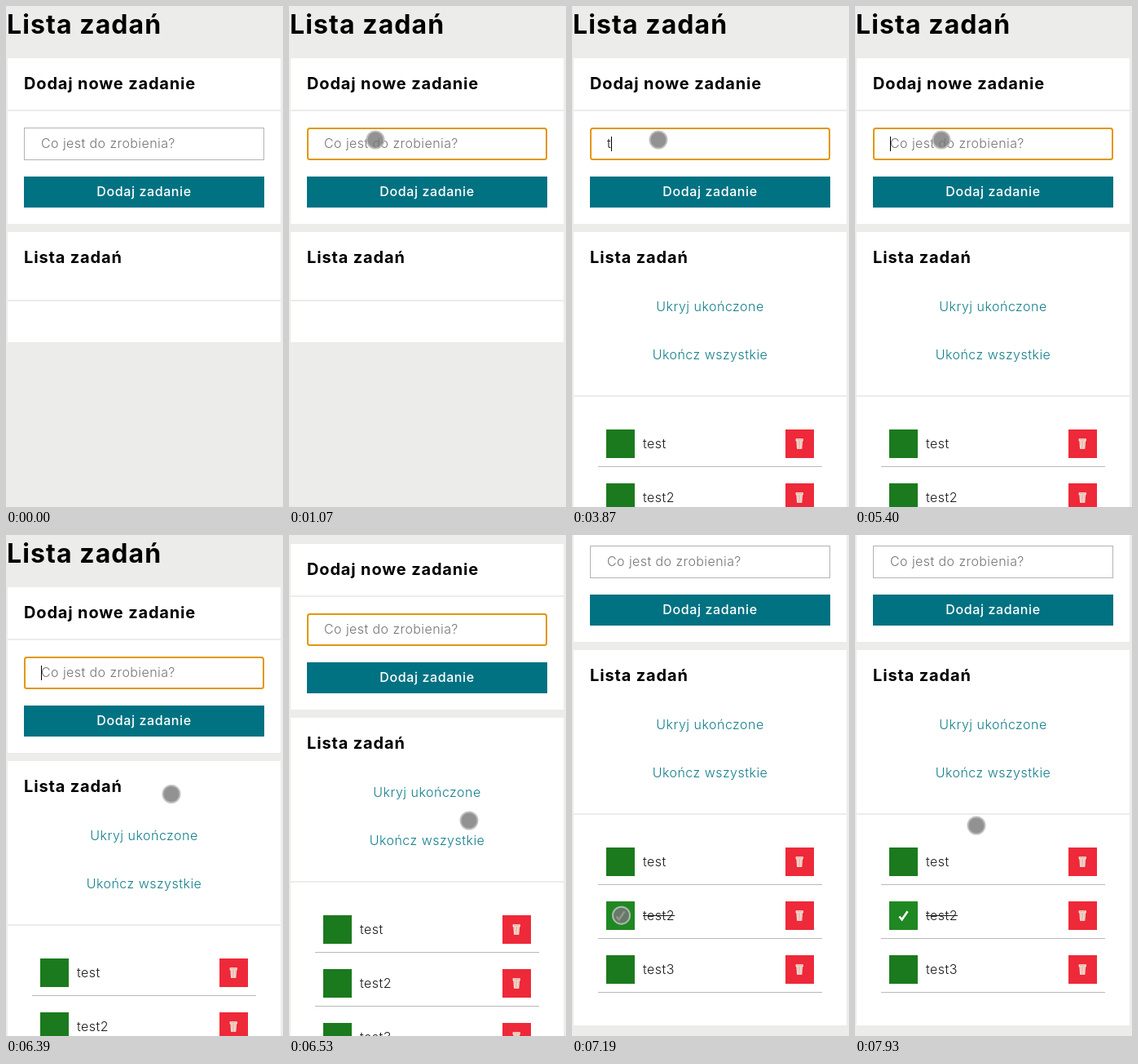
An HTML page for the animation above (8000 ms loop, 340x614 px).

```html
<!DOCTYPE html>
<html lang="pl">
<head>
<meta charset="utf-8">
<title>Lista zadań</title>
<style>
  html, body { margin: 0; width: 100%; height: 100%; overflow: hidden; background: #ececeb; }
  svg { display: block; width: 340px; height: 614px; }
  text { font: 360 16px Inter, "Open Sans", sans-serif; letter-spacing: .03em; fill: #1c1c1c; white-space: pre; }
  .h1 { font-size: 32px; font-weight: 700; fill: #000; letter-spacing: .034em; }
  .h2 { font-size: 20px; font-weight: 650; fill: #000; letter-spacing: .042em; }
  .mid { text-anchor: middle; }
  .link { fill: #127e8c; }
  .button { fill: #fff; font-weight: 460; letter-spacing: .038em; }
  .hint { fill: #757575; letter-spacing: .026em; }
</style>
</head>
<body>
<svg viewBox="0 0 340 614"></svg>
<script>
const LOOP = 8000, STEP = 200 / 3;
const svg = document.querySelector('svg');

function add(parent, tag, attrs, content = '') {
  const node = document.createElementNS('http://www.w3.org/2000/svg', tag);
  for (const key in attrs) node.setAttribute(key, attrs[key]);
  node.textContent = content;
  parent.append(node);
  return node;
}
const rect = (parent, x, y, width, height, fill) => add(parent, 'rect', { x, y, width, height, fill });
const label = (parent, x, y, cls, content) => add(parent, 'text', { x, y, class: cls }, content);
const show = (node, on) => node.setAttribute('visibility', on ? 'visible' : 'hidden');
const move = (node, x, y) => node.setAttribute('transform', `translate(${x} ${y})`);

const page = add(svg, 'g', {});
label(page, 1, 34, 'h1', 'Lista zadań');

// Form card
rect(page, 2, 64, 335, 203, '#fff');
rect(page, 2, 127, 335, 2, '#ececeb');
label(page, 22, 102, 'h2', 'Dodaj nowe zadanie');
const field = add(page, 'rect', { fill: '#fff' });
const hint = label(page, 43, 174, 'hint', 'Co jest do zrobienia?');
const typed = label(page, 43, 174, '', '');
const caret = rect(page, 43, 160, 1, 18, '#000');
rect(page, 22, 209, 295, 38, '#007282');
label(page, 169.5, 233, 'mid button', 'Dodaj zadanie');

// List card
const card = rect(page, 2, 277, 335, 135, '#fff');
const divider = rect(page, 2, 360, 335, 2, '#ececeb');
label(page, 22, 315, 'h2', 'Lista zadań');
const links = add(page, 'g', {});
label(links, 169.5, 374, 'mid link', 'Ukryj ukończone');
label(links, 169.5, 433, 'mid link', 'Ukończ wszystkie');

const tasks = [['test', 1930], ['test2', 3390], ['test3', 5400]].map(([name, at], i) => {
  const group = add(page, 'g', {});
  move(group, 0, 519 + 66 * i);
  const box = rect(group, 42, 0, 35, 35, '#1b7a1d');
  const check = add(group, 'path', { d: 'M54.5 18.5 57.6 22.3 64.6 12.2', fill: 'none', stroke: '#fff', 'stroke-width': 2.6 });
  const text = label(group, 87, 23, '', name);
  const strike = rect(group, 87, 17, 39, 1, '#1c1c1c');
  rect(group, 262, 0, 35, 35, '#ee2939');
  add(group, 'path', { d: 'M275.2 11.8h8v2h-8zM276 14l.6 9.3h5.2l.6-9.3M278 14.5l.2 8M280.4 14.5l-.2 8', fill: '#d9a092', stroke: '#f8efe4', 'stroke-width': 1.1 });
  rect(group, 32, 45, 275, 1, '#b9b9b9');
  return { group, box, check, text, strike, at };
});

const pointer = add(svg, 'circle', { r: 10.5, fill: '#777', 'fill-opacity': .8, stroke: '#bcbcbc', 'stroke-width': 2, 'stroke-opacity': .9 });

const FOCUS = 600, BLUR = 6930, CHECKED = 7000;
const typing = [
  [0, ''], [1270, 't'], [1330, 'te'], [1530, 'tes'], [1590, 'test'], [1930, ''],
  [2400, 't'], [2530, 'te'], [2730, 'tes'], [2800, 'test'], [3060, 'test2'], [3390, ''],
  [3870, 't'], [4130, 'te'], [4270, 'tes'], [4390, 'test'], [4600, 'test4'],
  [4930, 'test'], [5000, 'test3'], [5400, '']
];
const caretOn = [[600, 1070], [1270, 2130], [2400, 3530], [3870, 5530], [6060, 6530]];
const scrollPath = [[6400, 0], [6460, 14], [6530, 53], [6600, 108], [6670, 134], [6730, 136]];
const pointerPath = [
  [70, 317, 603], [330, 203, 355], [530, 112, 178], [600, 106, 164], [6000, 106, 164],
  [6270, 185, 285], [6530, 221, 350], [6670, 146, 398], [6860, 62, 464], [7330, 60, 467],
  [7660, 83, 527], [7800, 130, 437], [7930, 149, 356]
];

function along(path, t) {
  if (t <= path[0][0]) return path[0].slice(1);
  const i = path.findIndex(point => point[0] > t);
  if (i < 0) return path.at(-1).slice(1);
  const [from, to] = [path[i - 1], path[i]];
  const k = (t - from[0]) / (to[0] - from[0]);
  return from.slice(1).map((v, n) => v + (to[n + 1] - v) * k);
}

function drawField(t) {
  const focused = t >= FOCUS && t < BLUR;
  const inset = focused ? 1 : .5;
  const shape = {
    x: 22 + inset, y: 149 + inset, width: 295 - 2 * inset, height: 40 - 2 * inset,
    rx: focused ? 2.5 : 0, stroke: focused ? '#e0980a' : '#b3b3b3', 'stroke-width': 2 * inset
  };
  for (const key in shape) field.setAttribute(key, shape[key]);
  const value = typing.findLast(entry => entry[0] <= t)[1];
  typed.textContent = value;
  show(hint, !value);
  show(caret, caretOn.some(([from, to]) => t >= from && t < to));
  caret.setAttribute('x', 43 + Math.round(value ? typed.getComputedTextLength() : 0));
}

function drawList(t) {
  const count = tasks.filter(task => t >= task.at).length;
  card.setAttribute('height', count ? 262 + 66 * count : 135);
  divider.setAttribute('y', count ? 477 : 360);
  show(links, count);
  tasks.forEach((task, i) => {
    const done = i === 1 && t >= CHECKED;
    show(task.group, t >= task.at);
    task.check.setAttribute('opacity', +done);
    task.strike.setAttribute('opacity', +done);
    task.strike.setAttribute('width', task.text.getComputedTextLength());
    task.box.setAttribute('fill', done ? '#208822' : '#1b7a1d');
  });
}

function draw(now) {
  // The screen refreshes fifteen times a second, with a little slack for early ticks.
  const t = Math.round(Math.floor((now % LOOP + 10) / STEP) * STEP / 10) * 10;
  drawField(t);
  drawList(t);
  move(page, 0, -Math.round(along(scrollPath, t)[0]));
  move(pointer, ...along(pointerPath, t));
  show(pointer, t >= 70);
}

const start = performance.now();
function tick() {
  draw(performance.now() - start);
  requestAnimationFrame(tick);
}
tick();
</script>
</body>
</html>
```
